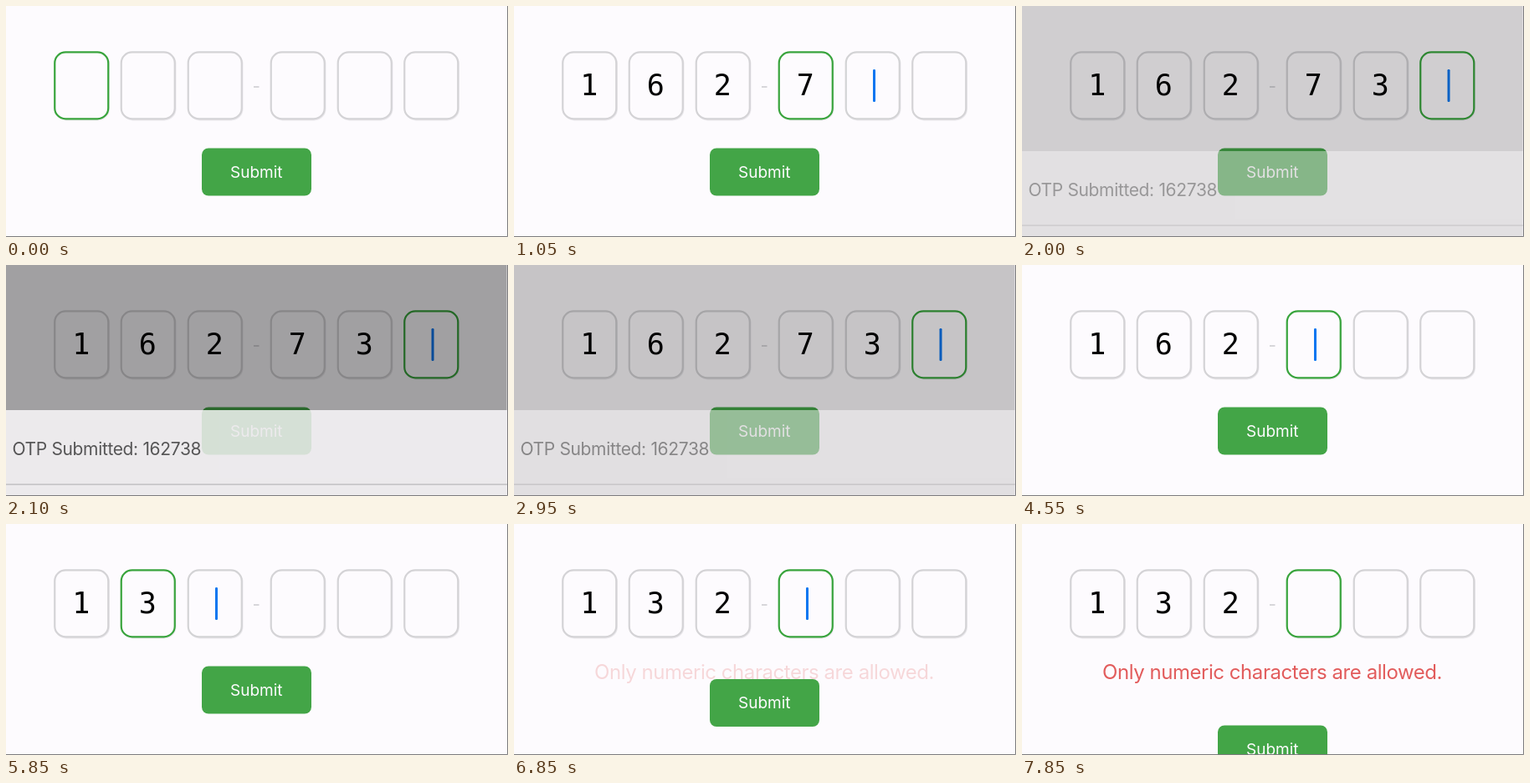
Recreate the animation shown at these times as an HTML page. Size 600 px wide and 277 px high, loop 8 s.

```html
<!DOCTYPE html>
<html lang="en">
<head>
<meta charset="utf-8">
<title>One-time code</title>
<style>
  html, body { margin: 0; width: 100%; height: 100%; overflow: hidden; background: #fdfbfe; }
  svg { display: block; width: 600px; height: 277px; font-family: Inter, sans-serif; }
  .digit { font: 35px "DejaVu Sans Mono", monospace; text-anchor: middle; }
  #error { font-size: 24px; letter-spacing: -0.45px; }
  #sheet text { font-size: 21px; letter-spacing: -0.35px; }
</style>
</head>
<body>
<svg viewBox="0 0 600 277">
  <rect width="600" height="277" fill="#fdfbfe"/>
  <g id="boxes"></g>
  <rect x="296" y="96.2" width="6.5" height="1.6" fill="#cfced1"/>
  <rect id="caret" y="76" width="3" height="39" rx="1.2" fill="#0a76f0"/>
  <text id="error" x="299" y="186" text-anchor="middle" fill="#e25c5c">Only numeric characters are allowed.</text>
  <g id="button">
    <rect x="234" y="170.5" width="131" height="57" rx="8" fill="#43a547"/>
    <text x="299.3" y="205.8" font-size="19" text-anchor="middle" fill="#fdfbfe">Submit</text>
  </g>
  <rect id="dim" width="598.6" height="277"/>
  <g id="sheet">
    <rect y="174" width="600" height="103" fill="#fffdff"/>
    <text x="7.5" y="228.3" fill="#444">OTP Submitted: 162738</text>
    <rect y="262.5" width="600" height="1.2" fill="#bcbbbd"/>
  </g>
  <path d="M0 276.5H599.5V0" fill="none" stroke="#7c7b7d"/>
</svg>
<script>
const LOOP = 8000, BORDER_MS = 150;
const GRAY = [212, 211, 214], GREEN = [56, 164, 60];
const BOX_X = [57.5, 137, 217, 316, 396, 475.5];

// time, typed digits, focused box
const STEPS = [
  [-1000, '', 0],
  [250, '1', 1], [550, '16', 2], [800, '162', 3],
  [1050, '1627', 4], [1450, '16273', 5],
  [3100, '', 0],
  [3850, '1', 1], [4150, '16', 2], [4400, '162', 3],
  [4950, '16', 2], [5400, '1', 1],
  [5850, '13', 2], [6200, '132', 3],
];

const byId = id => document.getElementById(id);
const clamp = v => Math.min(1, Math.max(0, v));
const progress = (t, start, length) => clamp((t - start) / length);
const smooth = p => p * p * (3 - 2 * p);

function add(parent, tag, attrs) {
  const el = document.createElementNS('http://www.w3.org/2000/svg', tag);
  for (const key in attrs) el.setAttribute(key, attrs[key]);
  return parent.appendChild(el);
}

const boxes = BOX_X.map(x => {
  const frame = { x: x + 0.75, y: 55.4, width: 64, height: 80, rx: 13, fill: 'none' };
  const group = byId('boxes');
  add(group, 'rect', { ...frame, x: x + 1.5, y: 56.4, stroke: '#ebe9ed', 'stroke-width': 2 });
  return {
    border: add(group, 'rect', { ...frame, fill: '#fdfbfe', 'stroke-width': 2.2 }),
    digit: add(group, 'text', { class: 'digit', x: x + 32.2, y: 107.4 }),
  };
});

function caretOpacity(t) {
  if (t < 250 || (t >= 3100 && t < 3500)) return 0;
  return 1 - progress(t, 7700, 150);
}

function sheetOpacity(t) {
  if (t < 2900) return smooth(progress(t, 1850, 350));
  return t < 3320 ? Math.exp((2900 - t) / 70) : 0;
}

function render(t) {
  const index = STEPS.findLastIndex(step => step[0] <= t);
  const [start, digits, focus] = STEPS[index];
  const previous = index ? STEPS[index - 1][2] : focus;
  const shift = progress(t, start, BORDER_MS);

  boxes.forEach((box, i) => {
    const green = (i === focus ? shift : 0) + (i === previous ? 1 - shift : 0);
    const color = GRAY.map((v, c) => Math.round(v + (GREEN[c] - v) * green));
    box.border.setAttribute('stroke', `rgb(${color})`);
    box.digit.textContent = digits[i] || '';
  });

  byId('caret').setAttribute('x', BOX_X[focus] + 33);
  byId('caret').setAttribute('opacity', caretOpacity(t));

  const reveal = smooth(progress(t, 6700, 500));
  byId('error').setAttribute('opacity', reveal);
  byId('button').setAttribute('transform', `translate(0 ${71 * reveal})`);

  const sheet = sheetOpacity(t);
  byId('dim').setAttribute('opacity', 0.455 * sheet);
  byId('sheet').setAttribute('opacity', sheet);
}

const origin = performance.now();
function tick() {
  render((performance.now() - origin) % LOOP);
  requestAnimationFrame(tick);
}
tick();
</script>
</body>
</html>
```
